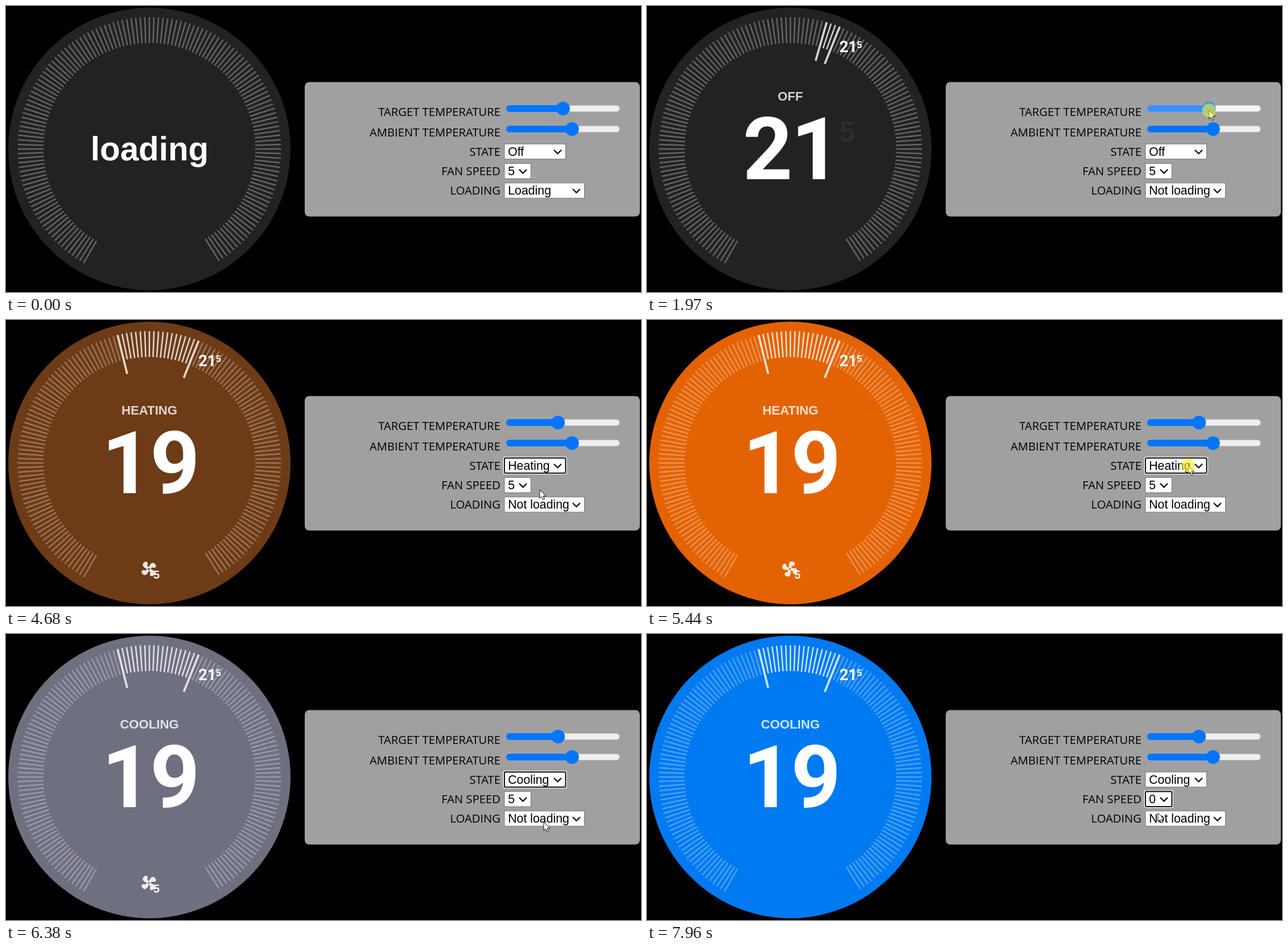
These frames come from a looping animation (1116 by 502 pixels, 8 s). An HTML page:

```html
<!DOCTYPE html>
<html lang="en">
<head>
<meta charset="utf-8">
<title>Thermostat dial</title>
<style>
  html, body { margin: 0; width: 100%; height: 100%; overflow: hidden; background: #000; }
  svg { display: block; }
  text { font-family: "Liberation Sans", Arial, sans-serif; }
  .dial text { font-weight: bold; fill: #fff; text-anchor: middle; }
  .dial .digits { font-family: Roboto, Arial, sans-serif; letter-spacing: -.02em; }
  .label { font: 20.2px "Open Sans", sans-serif; text-anchor: end; }
  .field { font-size: 21.3px; }
</style>
</head>
<body>
<svg id="stage" width="1116" height="502" viewBox="0 0 1116 502"></svg>
<script>
const LOOP = 8000;
const CX = 252, CY = 251, R = 248, SCALE = R / 200;
const MIN = 10, MAX = 30, TICKS = 150, AMBIENT = 21.5;
const READY = 1670;
const ROW = 26;
const DRAG = [1660, 3060];
const COLORS = { Off: [34, 34, 34], Heating: [227, 99, 4], Cooling: [0, 122, 241] };
const SLIDER_COLORS = {
  idle: ['#0075ff', '#efefef', '#b2b2b2'],
  hover: ['#005cc8', '#e5e5e5', '#a8a8a8'],
  press: ['#3793ff', '#f5f5f5', '#bcbcbc']
};

const stage = document.getElementById('stage');

function set(el, attrs) {
  for (const key in attrs) el.setAttribute(key, attrs[key]);
}
function add(parent, tag, attrs = {}, text = '') {
  const el = document.createElementNS('http://www.w3.org/2000/svg', tag);
  set(el, attrs);
  el.textContent = text;
  return parent.appendChild(el);
}
function show(el, on) {
  el.style.display = on ? '' : 'none';
}
const clamp = v => Math.max(0, Math.min(1, v));
const smooth = v => v * v * (3 - 2 * v);
const within = (t, [from, to]) => t >= from && t < to;

// cubic-bezier(.25, .1, .25, 1)
function ease(x) {
  const curve = (a, b, s) => 3 * a * s * (1 - s) ** 2 + 3 * b * s * s * (1 - s) + s ** 3;
  let lo = 0, hi = 1;
  for (let i = 0; i < 20; i++) {
    const mid = (lo + hi) / 2;
    if (curve(.25, .25, mid) < x) lo = mid; else hi = mid;
  }
  return curve(.1, 1, lo);
}

// Pointer script: everything the controls do follows from it
const moves = [], picks = [], presses = [DRAG];

function go(from, to, x, y) {
  moves.push({ from, to, x, y });
}
function pick(menu, reach, choose, close) {
  go(...reach);
  go(...choose);
  const open = reach[1] + 100;
  presses.push([open - 90, open], [close - 70, close + 20]);
  picks.push({ menu, open, close, row: menu.rowAt(choose[3]) });
}
function pointerAt(t) {
  return moves.reduce(([px, py], { from, to, x, y }) => {
    const k = smooth(clamp((t - from) / (to - from)));
    return [px + (x - px) * k, py + (y - py) * k];
  }, [934, 522]);
}

const thumbX = v => 891 + 176 * (v - MIN) / (MAX - MIN);
function targetAt(t) {
  const [x] = pointerAt(Math.max(DRAG[0], Math.min(DRAG[1], t)));
  return Math.round((MIN + (x - 891) / 176 * (MAX - MIN)) * 2) / 2;
}
// Share of the last 180 ms in which the half degree was on
function halfOpacity(t) {
  let on = 0;
  for (let i = 0; i < 18; i++) on += targetAt(t - i * 10) % 1 ? 1 : 0;
  return on / 18;
}

// Dial
const dial = add(stage, 'g', { class: 'dial' });
const face = add(dial, 'circle', { cx: CX, cy: CY, r: R });
const tickTop = CY - R + SCALE * 400 / 30;
const tickEnd = CY - R + SCALE * 50;
const ticks = Array.from({ length: TICKS }, (_, i) => add(dial, 'rect', {
  y: tickTop, transform: `rotate(${i * 2 - 150} ${CX} ${CY})`, fill: '#fff'
}));
const tickOf = v => Math.min(TICKS - 1, Math.round((v - MIN) / (MAX - MIN) * TICKS));

const loadingText = add(dial, 'text', { x: 252.5, y: 271, 'font-size': 58.3 }, 'loading');
const readout = add(dial, 'g');
const stateText = add(readout, 'text', { x: CX, y: 166, 'font-size': 22.2, 'fill-opacity': .8 });
const degrees = add(readout, 'text', { class: 'digits', x: CX + 1, y: 304, 'font-size': 153 });
const half = add(readout, 'text', { x: 352, y: 238, 'font-size': 50.5 }, '5');
add(readout, 'text', { class: 'digits', x: 353.5, y: 81, 'font-size': 28 }, '21');
add(readout, 'text', { x: 373.5, y: 74, 'font-size': 16 }, '5');

const fan = add(dial, 'g');
const rotor = add(fan, 'g', { fill: '#fff', opacity: .88 });
const BLADE = 'M12.5 2C17 2 17.11 5.57 14.75 6.75C13.76 7.24 13.32 8.29 13.13 9.22' +
  'L12 11L10.14 9.65C8.15 5.96 8.94 2 12.5 2Z';
for (let a = 0; a < 360; a += 90) add(rotor, 'path', { d: BLADE, transform: `rotate(${a} 12 12)` });
add(rotor, 'circle', { cx: 12, cy: 12, r: 2, fill: 'none', stroke: '#fff', 'stroke-width': 1.5 });
add(fan, 'text', { x: 264.6, y: 454, 'font-size': 19.8 }, '5');

// Control panel
add(stage, 'rect', { x: 525, y: 133.5, width: 589, height: 236, rx: 8, fill: '#a0a0a0' });

function makeLabel(text, y) {
  add(stage, 'text', { class: 'label', x: 869, y }, text);
}
function makeSlider(label, y) {
  makeLabel(label, y + 12.5);
  const track = add(stage, 'rect', { x: 879.5, y: y - 5.7, width: 199, height: 11.4, rx: 5.7 });
  const fill = add(stage, 'rect', { x: 879, y: y - 6, height: 12, rx: 6 });
  const thumb = add(stage, 'circle', { cy: y, r: 12 });
  return (value, pressed, [px, py]) => {
    const hover = Math.abs(py - y) < 12 && px > 879 && px < 1079;
    const [accent, back, edge] = SLIDER_COLORS[pressed ? 'press' : hover ? 'hover' : 'idle'];
    const x = thumbX(value);
    set(track, { fill: back, stroke: edge });
    set(fill, { width: x - 879, fill: accent });
    set(thumb, { cx: x, fill: accent });
  };
}

function makeSelect(label, y, width, options, first) {
  const right = 876 + width, height = 27.5, top = y + height;
  const frame = { x: 876, y: y + .5, width: width - .5, height: height - 1 };
  makeLabel(label, y + 21);
  add(stage, 'rect', { ...frame, fill: '#fff', stroke: '#767676' });
  const ring = add(stage, 'g', { fill: 'none' });
  add(ring, 'rect', {
    x: 874.4, y: y - 1.1, width: width + 2.7, height: height + 2.2, rx: 3, stroke: '#fff', 'stroke-width': 1.4
  });
  add(ring, 'rect', { ...frame, rx: 2, stroke: '#101010', 'stroke-width': 2 });
  const text = add(stage, 'text', { class: 'field', x: 882.2, y: y + 21 });
  add(stage, 'path', {
    d: `M${right - 21} ${y + 11}l6.5 6.5l6.5 -6.5`, fill: 'none', stroke: '#000', 'stroke-width': 2.2
  });
  return { options, first, top, width, ring, text, rowAt: py => Math.floor((py - top) / ROW) };
}
function addPopup(menu) {
  const { options, top, width } = menu;
  menu.popup = add(stage, 'g');
  add(menu.popup, 'rect', {
    x: 876.5, y: top, width, height: options.length * ROW + 1, fill: '#fff', stroke: '#767676'
  });
  menu.rows = options.map((option, i) => ({
    bar: add(menu.popup, 'rect', { x: 877, y: top + i * ROW, width: width - 1, height: ROW, fill: '#1967d2' }),
    text: add(menu.popup, 'text', { class: 'field', x: 882.2, y: top + i * ROW + 20 }, option)
  }));
}

const drawTarget = makeSlider('TARGET TEMPERATURE', 180);
const drawAmbient = makeSlider('AMBIENT TEMPERATURE', 216);
const state = makeSelect('STATE', 241.7, 108, ['Off', 'Heating', 'Cooling', 'Fan', 'Dry'], 0);
const speed = makeSelect('FAN SPEED', 276, 47, ['0', '1', '2', '3', '4', '5'], 5);
const loading = makeSelect('LOADING', 310.2, 141, ['Loading', 'Not loading'], 0);
const menus = [state, speed, loading];
menus.forEach(addPopup);

const pointer = add(stage, 'path', {
  d: 'M0 0V15.2L3.5 12L6.1 17.6L8.6 16.4L6.1 11H10.8Z', fill: '#fff', stroke: '#111'
});
const halo = add(stage, 'circle', { r: 12, fill: '#ffee22', opacity: .6 });

pick(loading, [30, 340, 940, 324], [450, 570, 945, 374], 690);
go(700, 800, 948, 319);
go(850, 1480, thumbX(20), 183);
go(1690, 1857, thumbX(21), 183);
go(2630, 2940, thumbX(19), 186);
pick(state, [3400, 3790, 945, 256], [3920, 4310, 938, 298], 4560);
pick(state, [4720, 5360, 951, 255], [5500, 5960, 945, 330], 6230);
pick(speed, [6420, 6900, 905, 291], [7120, 7720, 898, 314], 7840);

function choiceAt(menu, t) {
  const done = picks.filter(p => p.menu === menu && p.close <= t);
  const row = [menu.first, ...done.map(p => p.row)];
  return {
    value: menu.options[row.at(-1)],
    before: menu.options[row.at(-2) ?? menu.first],
    row: row.at(-1),
    since: done.length ? done.at(-1).close : 0
  };
}

function drawMenu(menu, t, py) {
  const { value, row } = choiceAt(menu, t);
  const open = picks.some(p => p.menu === menu && within(t, [p.open, p.close]));
  const last = picks.filter(p => p.open <= t).at(-1);
  const dragged = last && last.open < DRAG[0] && t >= DRAG[0];
  menu.text.textContent = value;
  show(menu.ring, last && last.menu === menu && !dragged);
  show(menu.popup, open);
  const lit = py >= menu.top ? menu.rowAt(py) : row;
  menu.rows.forEach(({ bar, text }, i) => {
    show(bar, i === lit);
    set(text, { fill: i === lit ? '#fff' : '#000' });
  });
}

function drawTicks(target, ready) {
  const ends = [tickOf(target), tickOf(AMBIENT)];
  ticks.forEach((tick, i) => {
    const active = ready && i >= Math.min(...ends) && i <= Math.max(...ends);
    const long = ready && ends.includes(i);
    const width = (long ? 3 : 2) * SCALE;
    set(tick, {
      x: CX - width / 2, width,
      height: tickEnd - tickTop + (long ? 20 * SCALE : 0),
      'fill-opacity': active ? .8 : .3
    });
  });
}

function drawDial(t) {
  const ready = t >= READY;
  const { value, before, since } = choiceAt(state, t);
  const k = ease(clamp((t - since) / 500));
  const rgb = COLORS[value].map((c, i) => Math.round(COLORS[before][i] + (c - COLORS[before][i]) * k));
  const target = targetAt(t);
  set(face, { fill: `rgb(${rgb})` });
  drawTicks(target, ready);
  show(loadingText, !ready);
  show(readout, ready);
  set(loadingText, { opacity: .7 + .3 * Math.cos(t * Math.PI / 500) });
  stateText.textContent = value.toUpperCase();
  degrees.textContent = Math.floor(target);
  set(half, { opacity: halfOpacity(t) });
  show(fan, value !== 'Off' && choiceAt(speed, t).value !== '0');
  set(rotor, { transform: `translate(251 437) rotate(${t * 540 / 1700}) scale(1.4) translate(-12 -12)` });
}

function draw(t) {
  const at = pointerAt(t);
  const [x, y] = at;
  drawDial(t);
  drawTarget(targetAt(t), within(t, DRAG), at);
  drawAmbient(21.8, false, at);
  menus.forEach(menu => drawMenu(menu, t, y));
  set(pointer, { transform: `translate(${x} ${y})` });
  set(halo, { cx: x, cy: y });
  show(halo, presses.some(span => within(t, span)));
}

const start = performance.now();
function frame() {
  draw((performance.now() - start) % LOOP);
  requestAnimationFrame(frame);
}
draw(0);
requestAnimationFrame(frame);
</script>
</body>
</html>
```
